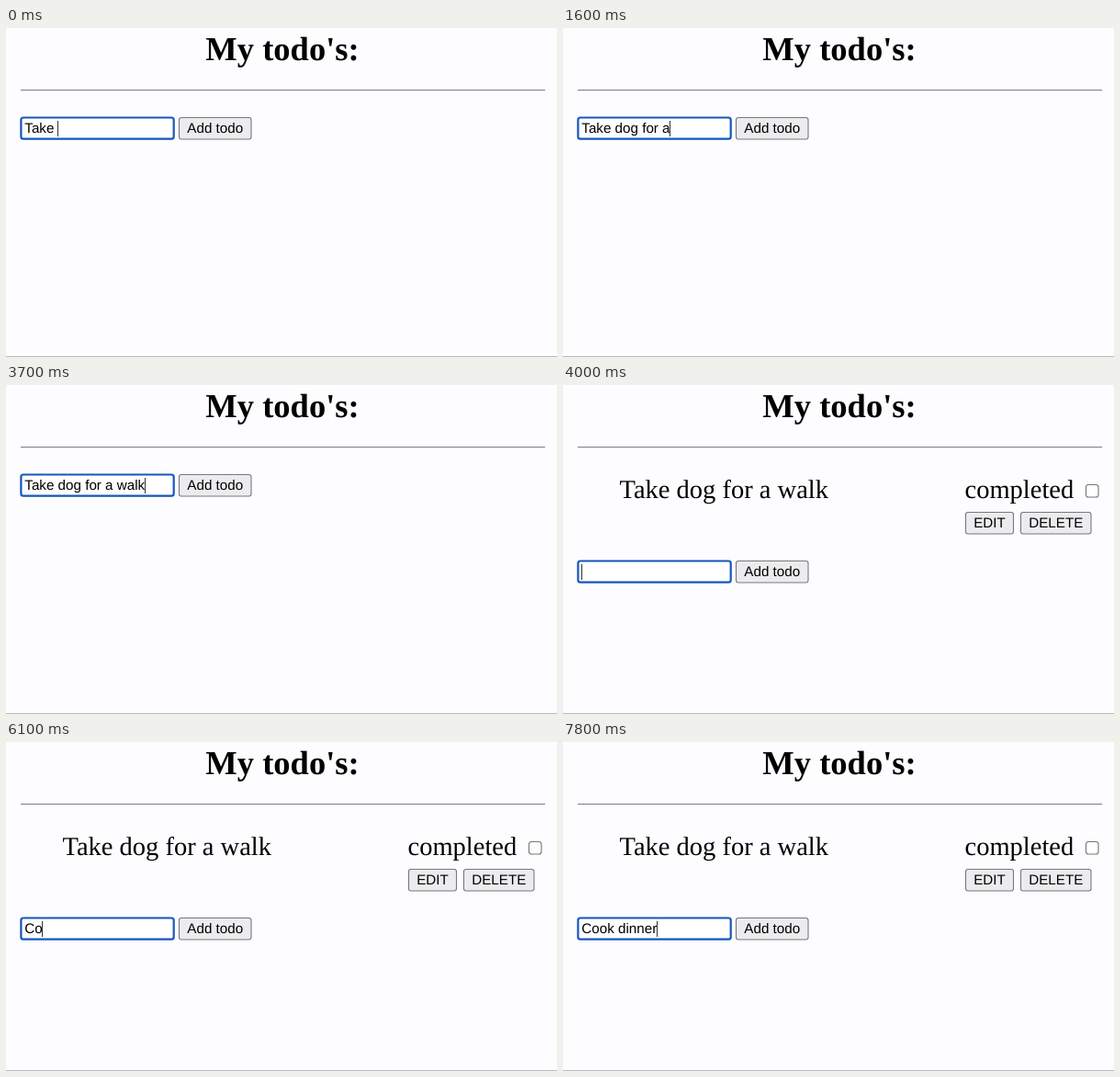
Recreate the animation shown at these times as an HTML page with a canvas. Size 600x358 px, loop 8 s.

```html
<!DOCTYPE html>
<html lang="en">
<head>
<meta charset="utf-8">
<title>Todo list</title>
<style>
  html, body { margin: 0; width: 100%; height: 100%; overflow: hidden; background: #fdfcfe; }
  canvas { display: block; }
</style>
</head>
<body>
<canvas id="stage" width="600" height="358"></canvas>
<script>
const ctx = document.getElementById('stage').getContext('2d');
const LOOP = 8000;
const SUBMIT = 4000;
const SANS = '15.2px "Liberation Sans", Arial, sans-serif';
const SERIF = '28.5px "Liberation Serif", Times, serif';
const TITLE = 'bold 36.5px "Liberation Serif", Times, serif';

// One time per typed character after the text already in the field
const first = {
  start: 'Take ',
  rest: 'dog for a walk',
  times: [100, 300, 600, 700, 1100, 1300, 1400, 1500, 1600, 1800, 2100, 2300, 2500, 2700]
};
const second = {
  start: '',
  rest: 'Cook dinner',
  times: [5800, 6100, 6200, 6400, 6700, 7000, 7100, 7400, 7500, 7600, 7800]
};
const caretOff = [[3200, 3700], [4200, 4700], [5200, 5700]];

function typed(entry, t) {
  const count = entry.times.filter(k => k <= t).length;
  return entry.start + entry.rest.slice(0, count);
}

function text(str, x, y, font, align = 'left') {
  ctx.font = font;
  ctx.textAlign = align;
  ctx.fillStyle = '#000';
  ctx.fillText(str, x, y);
}

function box(x, y, w, h, r, fill, stroke, line) {
  ctx.beginPath();
  ctx.roundRect(x, y, w, h, r);
  ctx.fillStyle = fill;
  ctx.fill();
  ctx.strokeStyle = stroke;
  ctx.lineWidth = line;
  ctx.stroke();
}

function button(label, x, y, w) {
  box(x + 0.5, y + 0.5, w - 1, 23.5, 2.5, '#ececee', '#78787a', 1.1);
  text(label, x + w / 2, y + 17.2, SANS, 'center');
}

function form(value, y, showCaret) {
  box(16.4, y + 0.5, 166.3, 23.2, 2.5, '#fff', '#1456bd', 2.2);
  text(value, 20.3, y + 17.2, SANS);
  if (showCaret) {
    const x = Math.floor(20.3 + ctx.measureText(value).width);
    ctx.fillStyle = '#333';
    ctx.fillRect(x, y + 4, 1, 17);
  }
  button('Add todo', 188, y, 79.5);
}

function todo(label) {
  text(label, 61.5, 123, SERIF);
  text('completed', 437.5, 123, SERIF);
  box(569.5, 108.5, 13.5, 13.5, 2.8, '#fff', '#767678', 1.1);
  button('EDIT', 438, 138, 53);
  button('DELETE', 498, 138, 77.5);
}

function draw(t) {
  ctx.fillStyle = '#fdfcfe';
  ctx.fillRect(0, 0, 600, 358);
  ctx.fillStyle = '#b9b9bb';
  ctx.fillRect(0, 357, 600, 1);

  text("My todo's:", 301, 35, TITLE, 'center');
  ctx.fillStyle = '#88878a';
  ctx.fillRect(16, 67, 571, 1.2);

  const caret = !caretOff.some(([a, b]) => t >= a && t < b);
  if (t < SUBMIT) {
    form(typed(first, t), 97, caret);
  } else {
    todo(first.start + first.rest);
    form(typed(second, t), 191, caret);
  }
}

ctx.textRendering = 'geometricPrecision';
const begin = performance.now();
function frame() {
  draw((performance.now() - begin) % LOOP);
  requestAnimationFrame(frame);
}
frame();
</script>
</body>
</html>
```
